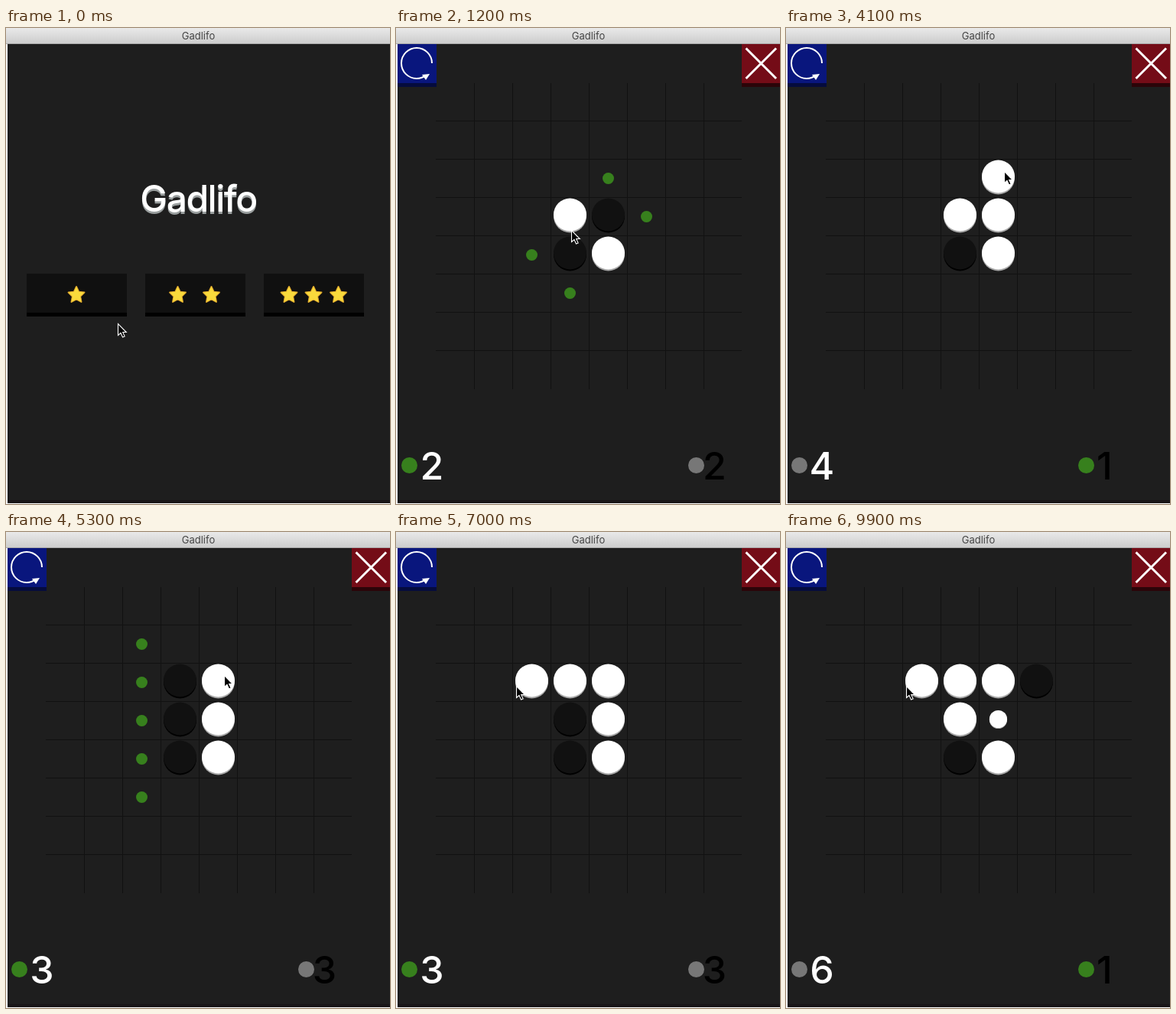
Recreate the animation shown at these times as an HTML page with a canvas. Size 502x622 px, loop 10 s.

```html
<!DOCTYPE html>
<html lang="en">
<head>
<meta charset="utf-8">
<title>Gadlifo</title>
<style>
  html, body { margin: 0; height: 100%; overflow: hidden; background: #fff; }
  canvas { display: block; }
</style>
</head>
<body>
<canvas id="stage" width="502" height="622"></canvas>
<script>
const ctx = document.getElementById('stage').getContext('2d');
const NAME = 'Gadlifo';
const LOOP = 10000, STEP = 100, GAME_START = 400, HALF_FLIP = 260;
const GREEN = '#37801d', GREY = '#777';

// Each piece turns over at every time in `flips`.
const pieces = [
  { col: 3, row: 3, white: true, at: 0, flips: [4600, 7100] },
  { col: 4, row: 3, white: false, at: 0, flips: [1900, 9780] },
  { col: 3, row: 4, white: false, at: 0, flips: [] },
  { col: 4, row: 4, white: true, at: 0, flips: [] },
  { col: 4, row: 2, white: true, at: 1900, flips: [] },
  { col: 3, row: 2, white: false, at: 4600, flips: [6400] },
  { col: 2, row: 2, white: true, at: 6400, flips: [] },
  { col: 5, row: 2, white: false, at: 9780, flips: [] }
];
const hints = [
  { from: 0, to: 1900, cells: [[4, 2], [5, 3], [2, 4], [3, 5]] },
  { from: 5300, to: 6400, cells: [[2, 1], [2, 2], [2, 3], [2, 4], [2, 5]] }
];
const scores = [
  { at: 0, white: 2, black: 2, whiteTurn: true },
  { at: 2600, white: 4, black: 1, whiteTurn: false },
  { at: 5300, white: 3, black: 3, whiteTurn: true },
  { at: 7800, white: 6, black: 1, whiteTurn: false }
];
const cursorPath = [
  [0, 146, 386], [300, 130, 338], [800, 130, 338], [1200, 229, 264],
  [1800, 285, 187], [5700, 285, 187], [6100, 157, 201], [LOOP, 157, 201]
];

const centerX = col => 77.5 + 50 * col;
const centerY = row => 96 + 50 * row;

function rect(x, y, w, h, color) {
  ctx.fillStyle = color;
  ctx.fillRect(x, y, w, h);
}

function dot(x, y, r, color) {
  ctx.fillStyle = color;
  ctx.beginPath();
  ctx.arc(x, y, r, 0, 2 * Math.PI);
  ctx.fill();
}

function polygon(points) {
  ctx.beginPath();
  points.forEach(([x, y]) => ctx.lineTo(x, y));
  ctx.closePath();
}

function label(text, x, y, size, color, weight = 500, spacing = 0) {
  ctx.font = `${weight} ${size}px Inter, sans-serif`;
  ctx.letterSpacing = spacing + 'px';
  ctx.textAlign = 'center';
  ctx.fillStyle = color;
  ctx.fillText(text, x, y);
}

function button(x, y, w, face, edge) {
  rect(x, y, w, 51, face);
  rect(x, y + 51, w, 5, edge);
}

function star(x, y) {
  polygon(Array.from({ length: 10 }, (_, i) => {
    const r = i % 2 ? 5.4 : 11, a = Math.PI * (i / 5 - 0.5);
    return [x + r * Math.cos(a), y + 1 + r * Math.sin(a)];
  }));
  ctx.lineJoin = 'round';
  ctx.lineWidth = 2;
  ctx.strokeStyle = '#dda52c';
  ctx.stroke();
  ctx.fillStyle = '#f9da3c';
  ctx.fill();
}

function drawWindow() {
  rect(0, 0, 502, 622, '#fff');
  const bar = ctx.createLinearGradient(0, 0, 0, 20);
  bar.addColorStop(0, '#e9e9e9');
  bar.addColorStop(1, '#cdcdcd');
  rect(0, 0, 502, 20, bar);
  rect(0, 20, 502, 1, '#aaa');
  rect(2, 21, 500, 600, '#1e1e1e');
  rect(2, 617, 500, 4, '#181517');
  label(NAME, 251.5, 15, 13, '#444', 400);
}

function drawMenu() {
  label(NAME, 251.5, 243, 48, '#9a9f9f', 500, -1.5);
  label(NAME, 251.5, 240, 48, '#fff', 500, -1.5);
  [[92], [224.5, 268.5], [370, 402, 434.5]].forEach((stars, i) => {
    button(27 + 155 * i, 321, 131, '#101010', '#000');
    stars.forEach(x => star(x, 348));
  });
}

function drawControls() {
  button(2, 21, 51, '#09167d', '#050b3e');
  button(452, 21, 50, '#740c17', '#2b0408');
  ctx.strokeStyle = '#fff';
  ctx.lineWidth = 2;
  ctx.beginPath();
  ctx.arc(27, 46, 20, 0, 0.3 * Math.PI, true);
  ctx.stroke();
  polygon([[34, 61], [44, 60], [39, 68]]);
  ctx.fillStyle = '#fff';
  ctx.fill();
  ctx.lineWidth = 3;
  ctx.beginPath();
  ctx.moveTo(457.5, 26.5);
  ctx.lineTo(497, 66);
  ctx.moveTo(497, 26.5);
  ctx.lineTo(457.5, 66);
  ctx.stroke();
}

function drawPiece({ col, row, white, at, flips }, t) {
  if (t < at) return;
  let scale = 1;
  for (const start of flips) {
    const phase = (t - start) / HALF_FLIP;
    if (phase >= 1) white = !white;
    if (phase >= 0 && phase < 2) scale = Math.abs(1 - phase);
  }
  const x = centerX(col), y = centerY(row) - 1;
  dot(x, y + scale, 21.5 * scale, white ? '#a8a8a8' : '#000');
  dot(x, y - scale, 21.5 * scale, white ? '#fff' : '#111');
}

function drawGame(t) {
  drawControls();
  for (let i = 1; i < 8; i++) {
    rect(52 + 50 * i, 72, 1, 400, '#111');
    rect(52, 71 + 50 * i, 400, 1, '#111');
  }
  hints.filter(h => t >= h.from && t < h.to).forEach(h =>
    h.cells.forEach(([col, row]) => dot(centerX(col), centerY(row) + 0.5, 7.5, GREEN)));
  pieces.forEach(p => drawPiece(p, t));

  const score = scores.findLast(s => t >= s.at);
  dot(17.5, 571.5, 10.5, score.whiteTurn ? GREEN : GREY);
  dot(392.5, 571.5, 10.5, score.whiteTurn ? GREY : GREEN);
  label(score.white, 47, 590, 50, '#fff');
  label(score.black, 416.5, 590, 50, '#000');
}

function drawCursor(t) {
  const next = cursorPath.findIndex(k => k[0] > t);
  const [t0, x0, y0] = cursorPath[next - 1], [t1, x1, y1] = cursorPath[next];
  const p = (t - t0) / (t1 - t0);
  ctx.save();
  ctx.translate(x0 + (x1 - x0) * p + 0.5, y0 + (y1 - y0) * p + 0.5);
  polygon([[0, 0], [0, 15], [3.5, 12], [6, 17.5], [8.6, 16.4], [6.2, 11], [10.8, 11]]);
  ctx.fillStyle = '#000';
  ctx.fill();
  ctx.lineJoin = 'miter';
  ctx.lineWidth = 1.1;
  ctx.strokeStyle = '#fff';
  ctx.stroke();
  ctx.restore();
}

const startTime = performance.now();
function frame() {
  const elapsed = (performance.now() - startTime) % LOOP;
  const t = Math.floor(elapsed / STEP) * STEP;
  drawWindow();
  if (t < GAME_START) drawMenu();
  else drawGame(t);
  drawCursor(t);
  requestAnimationFrame(frame);
}
frame();
</script>
</body>
</html>
```
